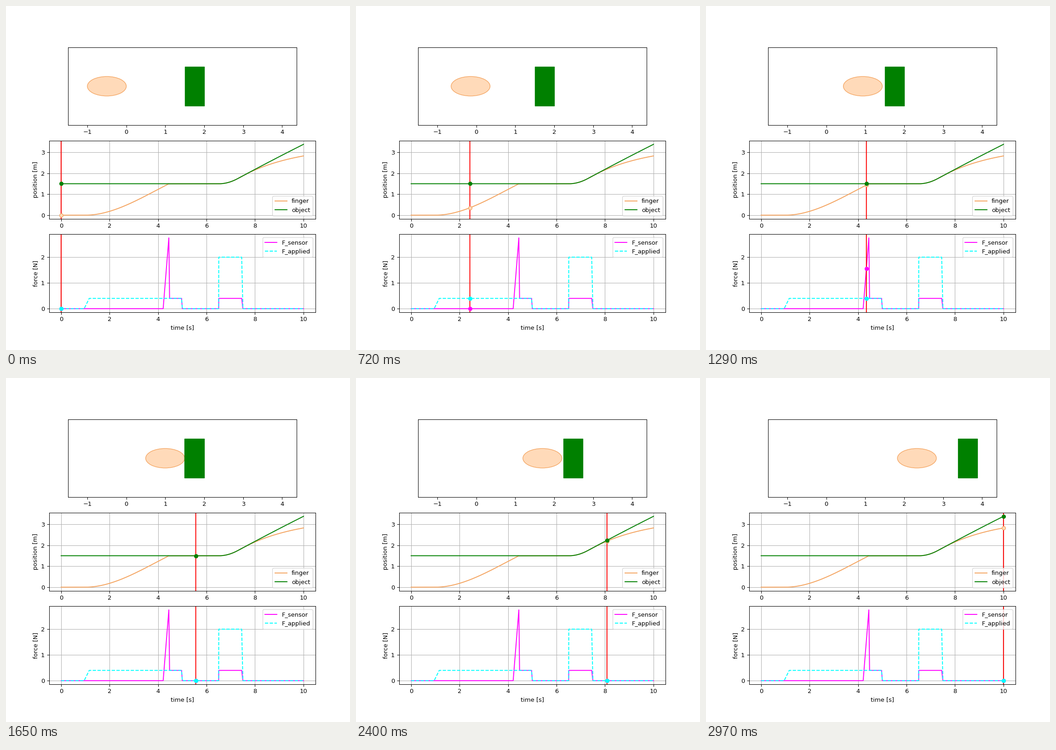
A matplotlib script that plays this animation: 748 px wide and 748 px high, repeating every 3000 ms.

```python
import numpy as np
import matplotlib.pyplot as plt
from matplotlib.animation import FuncAnimation
from matplotlib.patches import Ellipse, Rectangle

N_FRAMES = 100
T_END = 10.0
T_START, T_HIT, T_PUSH, T_RELEASE = 1.0, 4.445, 6.5, 7.5
WALL = 1.5                  # initial object position
DENT = 0.003                # tiny shift on contact
ACC, RAMP = 0.8, 0.78       # push acceleration and its duration
FRICTION = 0.016            # slow deceleration after the push
COAST_SPEED, DRAG = 0.62, 0.432


def object_pos(t):
    s = np.clip(t - T_PUSH, 0, None)
    slide = np.clip(s - RAMP, 0, None)
    push = ACC * np.minimum(s, RAMP)**2 / 2
    return (WALL - DENT * (t >= T_HIT) + push
            + ACC * RAMP * slide - FRICTION * slide**2 / 2)


def finger_pos(t):
    s = np.clip(t - T_START, 0, None)
    approach = 0.2078 * s**2 - 0.0237 * s**3
    d = np.clip(t - T_RELEASE, 0, None)
    coast = object_pos(T_RELEASE) + COAST_SPEED / DRAG * (1 - np.exp(-DRAG * d))
    return np.where(t < T_HIT, approach,
                    np.where(t < T_RELEASE, object_pos(t), coast))


def pulse(t, rise, top, fall, end, height):
    """Trapezoid: up from rise to top, down from fall to end."""
    return height * np.minimum(np.interp(t, [rise, top], [0, 1]),
                               np.interp(t, [fall, end], [1, 0]))


def applied_force(t):
    return (pulse(t, 0.95, 1.16, 4.97, 5.0, 0.4)
            + pulse(t, T_PUSH, T_PUSH + 0.005, 7.45, T_RELEASE, 2))


def sensor_force(t):
    impact = pulse(t, 4.21, T_HIT, T_HIT, T_HIT + 0.03, 2.75)
    hold = pulse(t, T_HIT, T_HIT + 0.03, 4.97, 5.0, 0.4)
    return impact + hold + pulse(t, T_PUSH, T_PUSH + 0.005, 7.45, T_RELEASE, 0.4)


fig, (ax_scene, ax_pos, ax_force) = plt.subplots(3, 1, figsize=(8, 8), dpi=93.5)
fig.subplots_adjust(bottom=0.1098)

# Scene
ax_scene.set_aspect("equal")
ax_scene.set_xlim(-1.5, 4.374)
ax_scene.set_ylim(-1, 1)
ax_scene.set_yticks([])
finger = Ellipse((-0.5, 0), 1, 0.5, fc="peachpuff", ec="sandybrown")
block = Rectangle((WALL, -0.5), 0.5, 1, color="green")
ax_scene.add_patch(finger)
ax_scene.add_patch(block)

# Curves
t = np.linspace(0, T_END, 2001)
ax_pos.plot(t, finger_pos(t), color="sandybrown", label="finger")
ax_pos.plot(t, object_pos(t), color="green", label="object")
ax_pos.set_ylabel("position [m]")
ax_pos.legend(loc="lower right")

ax_force.plot(t, sensor_force(t), color="magenta", label="F_sensor")
ax_force.plot(t, applied_force(t), "--", color="cyan", label="F_applied")
ax_force.set_xlabel("time [s]")
ax_force.set_ylabel("force [N]")
ax_force.legend(loc="upper right")

for ax in (ax_pos, ax_force):
    ax.grid(True)

# Time cursors and markers
cursors = [ax.axvline(0, color="red", snap=False) for ax in (ax_pos, ax_force)]


def marker(ax, **style):
    return ax.plot([0], [0], "o", **style)[0]


tracks = [
    (marker(ax_pos, mfc="peachpuff", mec="sandybrown"), finger_pos),
    (marker(ax_pos, color="green"), object_pos),
    (marker(ax_force, color="magenta"), sensor_force),
    (marker(ax_force, color="cyan"), applied_force),
]


def update(i):
    now = T_END * i / (N_FRAMES - 1)
    finger.set_center((float(finger_pos(now)) - 0.5, 0))
    block.set_x(float(object_pos(now)))
    for line in cursors:
        line.set_xdata([now, now])
    for dot, value in tracks:
        dot.set_data([now], [float(value(now))])
    return [finger, block, *cursors, *(dot for dot, _ in tracks)]


anim = FuncAnimation(fig, update, frames=N_FRAMES, interval=30,
                     repeat=True, repeat_delay=0, blit=False)
plt.show()
```
